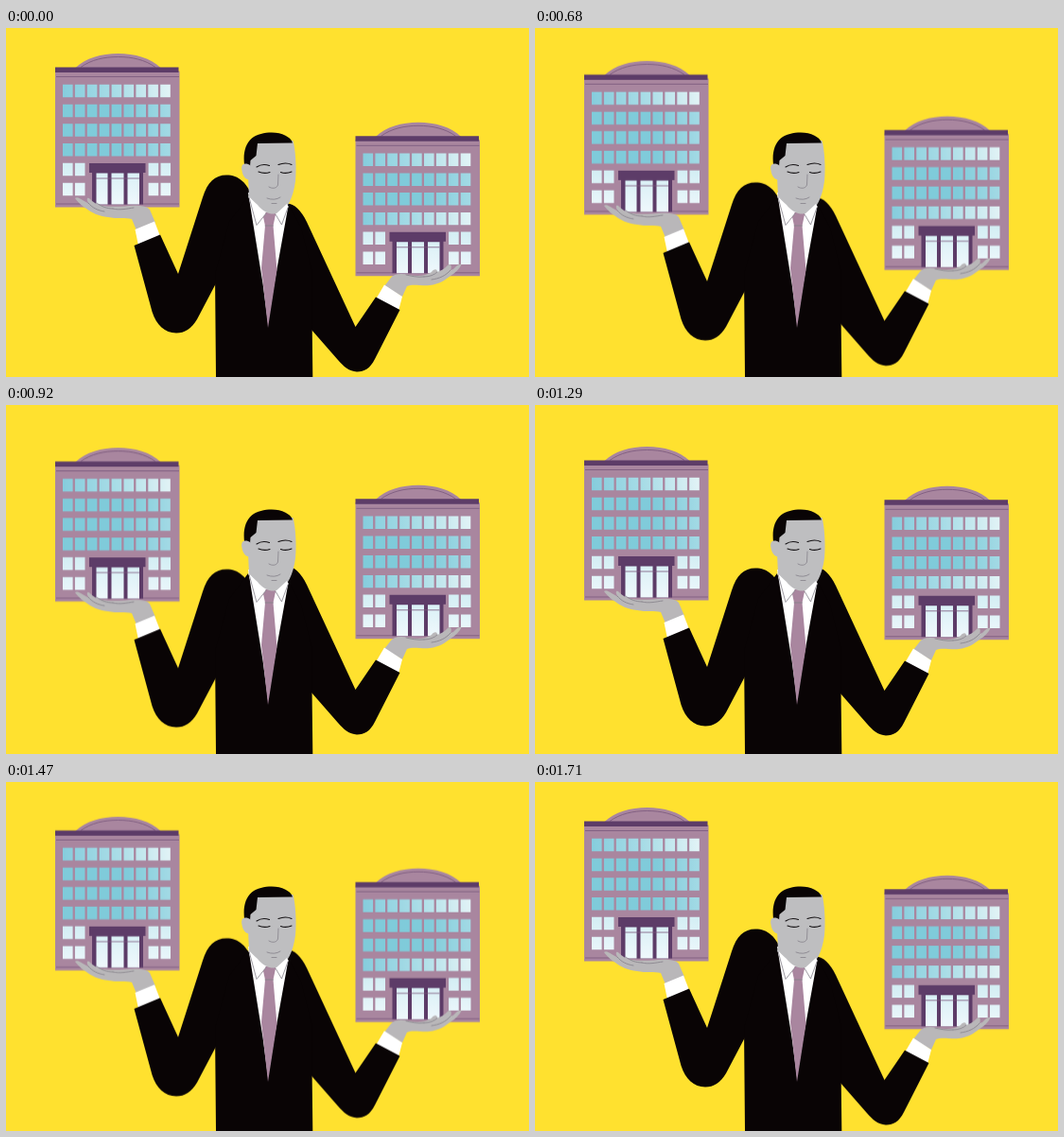
An HTML page that plays this animation: 553 by 369 pixels, repeating every 1810 ms.

```html
<!DOCTYPE html>
<html lang="en">
<head>
<meta charset="utf-8">
<title>Weighing two buildings</title>
<style>
  html, body { margin: 0; width: 100%; height: 100%; overflow: hidden; background: #ffe12f; }
  svg { display: block; width: 100%; height: 100%; }

  .left, .right { animation: 1810ms step-end infinite; }
  .left { animation-name: sink; --low: url(#deep); }
  .right { animation-name: rise; --low: url(#fade); }

  @keyframes sink {
    0% { transform: translateY(0); }
    29.28% { transform: translateY(0); animation-timing-function: steps(14, jump-start); }
    52.48% { transform: translateY(18.2px); }
    71.27% { transform: translateY(18.2px); animation-timing-function: steps(15, jump-start); }
    96.13%, 100% { transform: translateY(0); }
  }
  @keyframes rise {
    0% { transform: translateY(0); }
    29.28% { transform: translateY(0); animation-timing-function: steps(14, jump-start); }
    52.48% { transform: translateY(-15px); }
    71.27% { transform: translateY(-15px); animation-timing-function: steps(15, jump-start); }
    96.13% { transform: translateY(-.9px); }
    100% { transform: translateY(0); }
  }

  .suit { fill: #090405; }
  .skin { fill: #bebec0; }
  .hand { fill: #b9b7b9; }
  .white { fill: #fff; }
  .mauve { fill: #a9869f; }
  .plum { fill: #5d3c68; }
  .line { fill: none; stroke: #85808a; stroke-width: .8; stroke-linecap: round; stroke-linejoin: round; }
  .trim { fill: none; stroke: #79577b; stroke-width: .8; }
  .brow { fill: none; stroke: #141113; stroke-width: 1.1; stroke-linecap: round; }
  .panes { fill: none; stroke-width: 13.4; stroke-dasharray: 10.6 2.3; }
  .low { stroke: var(--low); }
</style>
</head>
<body>
<svg viewBox="0 0 553 369" preserveAspectRatio="none">
  <defs>
    <linearGradient id="fade" gradientUnits="userSpaceOnUse" x1="60" y1="0" x2="174" y2="0">
      <stop offset="0" stop-color="#86cddd"/>
      <stop offset=".5" stop-color="#a9dde7"/>
      <stop offset="1" stop-color="#e2f3f6"/>
    </linearGradient>
    <linearGradient id="deep" gradientUnits="userSpaceOnUse" x1="60" y1="0" x2="174" y2="0">
      <stop offset="0" stop-color="#7fcbda"/>
      <stop offset=".6" stop-color="#80cbda"/>
      <stop offset="1" stop-color="#a3dae5"/>
    </linearGradient>
    <linearGradient id="pale" gradientUnits="userSpaceOnUse" x1="0" y1="142" x2="0" y2="186">
      <stop offset="0" stop-color="#d3eef4"/>
      <stop offset="1" stop-color="#eff8fc"/>
    </linearGradient>

    <g id="building">
      <path class="mauve" d="M73 42C84 31 101 26.500 118.500 26.500S153 31 164 42Z"/>
      <path class="trim" d="M79 41C90 33 104 30 118.500 30S147 33 158 41"/>
      <path class="mauve" d="M52 45H183.500V189H52Z"/>
      <path class="plum" d="M52 41H182.500V46.500H52Z"/>
      <path class="trim" d="M53 51H183M53 185.500H183"/>
      <g class="panes">
        <path stroke="url(#fade)" d="M60 66H174"/>
        <path stroke="url(#deep)" d="M60 87H174M60 107.500H174"/>
        <path class="low" d="M60 128.300H174"/>
        <path stroke="url(#pale)" d="M60 149H83.500M150.600 149H174M60 170H83.500M150.600 170H174"/>
      </g>
      <path class="plum" d="M88 142.500H147.500V152.500H145V186H91V152.500H88Z"/>
      <path fill="url(#pale)" d="M95.500 153H107.500V186H95.500ZM111.500 153H124.500V186H111.500ZM128.500 153H141V186H128.500Z"/>
      <path class="trim" d="M95 158.500H141"/>
    </g>
  </defs>

  <rect width="553" height="369" fill="#ffe12f"/>

  <g class="left">
    <use href="#building" y=".5"/>
    <path class="hand" d="M73 180C75 178 78 180 81 182L88 186C84 181 86 178 89 181C92 184 96 187 102 188C108 189 116 189 125 188.500C138 187 149 188 152 192L158 206L138 214L133 202C127 200 117 202 108 200C98 199 90 195 85 191C80 188 75 183 73 180Z"/>
    <path class="line" d="M87 185C91 190 97 193 104 194M96 185C101 189 107 191 113 191M113 191C120 193 128 191 135 190"/>
    <path class="white" d="M136.500 213L157 204.500L163 220L140 230Z"/>
    <path class="suit" d="M135.500 230L163 218.500L182 260L208 179C213 163 221 155.500 233 155.500C246 155.500 255 163 262 182L280 230L222 270L202 308C196 318 189 322.500 180 322.500C168 322.500 159 314 154.500 300Z"/>
  </g>

  <g class="right">
    <use href="#building" x="317.500" y="73.300"/>
    <path class="hand" d="M481.500 250C479 249 476 252 473 255L470 256C472 252 470 248 467 251C463 255 459 257 456 258C456 254 452 255 450 258C444 262 436 263 426 261C417 259 410 260 407 264L400 273L419 284L424 273C430 270 439 273 448 272C458 271 465 266 470 262C475 259 480 254 481.500 250Z"/>
    <path class="line" d="M470 256C465 262 458 265 450 266M456 258C453 261 448 263 442 263M442 263C435 264 428 262 423 261"/>
    <path class="white" d="M400 271.500L419 284L415 299L391.500 286Z"/>
    <path class="suit" d="M391 284.500L416.500 298L390 350C385 360 379 363.500 371 363.500C363 363 357 358 351 351L323 319L275 240L291 188C300 182 310 189 318 205L369.500 316Z"/>
  </g>

  <path class="suit" d="M222 369L221 260L236 205L256 178L277 235L299 187L312 211L323 255L324.300 369Z"/>
  <path class="white" d="M256 174L271.500 270L277 312L283 274L298.500 188L285 180Z"/>
  <path class="mauve" d="M271 195H285.500L282.500 209L286.500 256L277 317L270 254L274 209Z"/>
  <path class="line" d="M274 209H282.500"/>
  <path class="skin" d="M255 135L264 119H303.500C306 128 307.500 148 306 162C303.500 180 298 191 289 195.500C281 198.500 272 195 266 187L257 179Z"/>
  <path class="white" d="M256 177L265 187L275 196L265 208.500ZM285 197L297 186L298.500 189L291.500 208Z"/>
  <path class="line" d="M257 179L265 208.500L275 196M285 197L291.500 208L298 190"/>
  <path class="suit" d="M253.500 153C250 138 251 124 260 116.500C269 109.500 287 109 295 113.500C300 116 302 118.500 303 121.500L266 122L264.500 135L258.500 140L257.500 153Z"/>
  <path class="skin" d="M258 145C251 141.500 248 145 249.500 151C250.500 157 254 161.500 258.500 160Z"/>
  <path class="brow" d="M265 147C269 144.300 274 144 278.500 145.500M288 144.500C293 142.500 298 142.500 302 144.500"/>
  <path class="brow" d="M267 152Q273 154.500 279 152.500M290.500 152.500Q296 154.500 302 152"/>
  <path class="line" d="M288 155L287.500 166C286 170 281 170 278 168M276 180Q284 183 290 179M281 185.500H286"/>
</svg>
</body>
</html>
```
